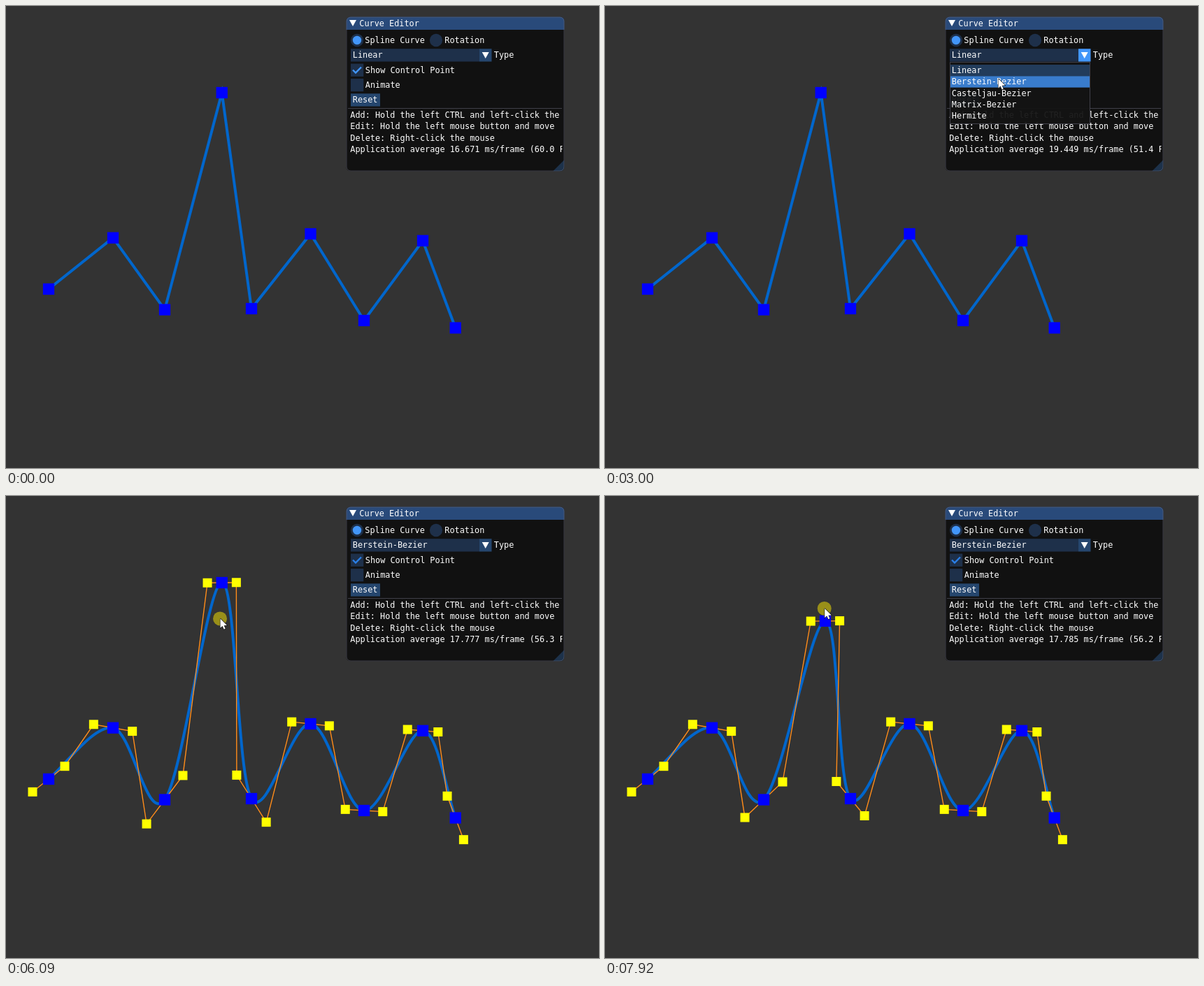
Animation of 848 by 661 pixels, one loop 7990 ms. Source, as an HTML page with a canvas:

```html
<!DOCTYPE html>
<html lang="en">
<head>
<meta charset="utf-8">
<title>Curve Editor</title>
<style>
html, body { margin: 0; width: 100%; height: 100%; overflow: hidden; background: #333; }
canvas { display: block; }
</style>
</head>
<body>
<canvas width="848" height="661"></canvas>
<script>
const ctx = document.querySelector('canvas').getContext('2d');
const LOOP = 7990, STEP = 70, LAST = 7910;
const HOVER = 1750, OPEN = 2310, SELECT = 3150, GRAB = 4830, DRAG = 6790, CLICK = 140;
const FRAME = '#1e304a', BUTTON = '#25466e', ACCENT = '#4296fa', BORDER = 'rgba(110,110,128,.5)';
const TYPES = ['Linear', 'Berstein-Bezier', 'Casteljau-Bezier', 'Matrix-Bezier', 'Hermite'];
const LEFT = 493, ROW = 21.36, FRAME_H = 18.3, LINE = 16.3;
const HOME = [[61, 405], [153, 331.7], [227, 434.5], [308.7, 124], [351, 433],
  [435.5, 326], [512, 450], [596, 335.8], [642.7, 460.5]];

// Turning points of the pointer: time, x, y
const CURSOR = [[70, 590, 635], [840, 612, 103], [1190, 566, 112], [1750, 589, 66],
  [OPEN, 589, 66], [3010, 562, 104], [SELECT, 562, 104], [3640, 200, 403],
  [4130, 303, 108], [4480, 316, 118], [5040, 310, 118], [5880, 306, 271],
  [6230, 306, 125], [6685, 318, 126], [6930, 322, 238], [7350, 322, 285], [8120, 312, 135]];
// Measured frame time: time, ms
const FRAME_MS = [[0, 16.671], [2030, 19.874], [3010, 19.449], [4480, 16.89],
  [6090, 17.777], [6930, 16.818], [7910, 17.785]];

const linear = u => u;
const swing = u => (1 - Math.cos(Math.PI * u)) / 2;

function sample(keys, t, ease) {
  const i = Math.max(1, keys.findIndex(k => k[0] > t) + keys.length) % keys.length || keys.length - 1;
  const a = keys[i - 1], b = keys[i];
  const u = ease(Math.min(1, Math.max(0, (t - a[0]) / (b[0] - a[0]))));
  return a.slice(1).map((v, n) => v + (b[n + 1] - v) * u);
}

const cursorAt = t => sample(CURSOR, Math.max(t, CURSOR[0][0]), swing);

function rect(x, y, w, h, color) {
  ctx.fillStyle = color;
  ctx.fillRect(x, y, w, h);
}

const square = ([x, y], size, color) => rect(x - size / 2, y - size / 2, size, size, color);

function disc(x, y, r, color) {
  ctx.fillStyle = color;
  ctx.beginPath();
  ctx.arc(x, y, r, 0, 7);
  ctx.fill();
}

function polygon(points, color) {
  ctx.fillStyle = color;
  ctx.beginPath();
  points.forEach(p => ctx.lineTo(...p));
  ctx.fill();
}

function polyline(points, color, width) {
  ctx.strokeStyle = color;
  ctx.lineWidth = width;
  ctx.beginPath();
  points.forEach(p => ctx.lineTo(...p));
  ctx.stroke();
}

function text(s, x, middle) {
  ctx.fillStyle = '#fff';
  ctx.fillText(s, x - .7, middle + 4);
}

const downArrow = (x, y) => polygon([[x - 5, y - 4], [x + 5, y - 4], [x, y + 5]], '#fff');

// Handles sit one sixth of the neighbour span away; a quarter of the segment at the ends.
function withHandles(points) {
  return points.map((p, i) => {
    const a = points[i - 1] || p, b = points[i + 1] || p;
    const k = a === p || b === p ? 4 : 6;
    const dx = (b[0] - a[0]) / k, dy = (b[1] - a[1]) / k;
    return [[p[0] - dx, p[1] - dy], p, [p[0] + dx, p[1] + dy]];
  });
}

function drawCurve(points, bezier) {
  if (!bezier) {
    polyline(points, '#0066cc', 4);
  } else {
    const knots = withHandles(points);
    ctx.strokeStyle = '#0066cc';
    ctx.lineWidth = 4;
    ctx.beginPath();
    ctx.moveTo(...points[0]);
    for (let i = 1; i < knots.length; i++)
      ctx.bezierCurveTo(...knots[i - 1][2], ...knots[i][0], ...points[i]);
    ctx.stroke();
    polyline(knots.flat(), '#ff8c1a', 1.4);
    knots.forEach(([a, , b]) => [a, b].forEach(h => square(h, 13, '#ff0')));
  }
  points.forEach(p => square(p, 16.3, '#00f'));
}

function drawPanel(t, bezier, open, hover) {
  const middle = row => 49 + row * ROW;
  const box = (x, row, w, color) => rect(x, middle(row) - FRAME_H / 2, w, FRAME_H, color);

  ctx.save();
  ctx.beginPath();
  ctx.roundRect(486.5, 15.5, 312, 221, 6);
  ctx.clip();
  rect(486, 15, 313, 222, '#111');
  rect(486, 15, 313, 19, '#294a7a');
  polygon([[782, 236.5], [798.5, 220], [798.5, 236.5]], '#1d324b');
  ctx.restore();
  ctx.strokeStyle = BORDER;
  ctx.lineWidth = 1;
  ctx.beginPath();
  ctx.roundRect(487, 16, 311, 220, 6);
  ctx.stroke();

  downArrow(496, 24);
  text('Curve Editor', 506, 25);
  disc(502, middle(0), FRAME_H / 2, FRAME);
  disc(502, middle(0), 6.2, ACCENT);
  text('Spline Curve', 514, middle(0));
  disc(615, middle(0), FRAME_H / 2, FRAME);
  text('Rotation', 628, middle(0));

  box(LEFT, 1, 184, hover ? BUTTON : FRAME);
  box(677, 1, 17.5, hover || open ? ACCENT : BUTTON);
  downArrow(685.7, 70);
  text(TYPES[bezier ? 1 : 0], 496.5, middle(1));
  text('Type', 698.5, middle(1));

  box(LEFT, 2, FRAME_H, FRAME);
  polyline([[496, 91.5], [500, 95.5], [508, 87.5]], bezier ? '#2a7fe6' : ACCENT, 2.4);
  text('Show Control Point', 514.5, middle(2));
  box(LEFT, 3, FRAME_H, FRAME);
  text('Animate', 514.5, middle(3));
  box(LEFT, 4, 42, BUTTON);
  text('Reset', 496.5, middle(4));
  rect(489, 146, 306, 1, '#3f3f48');

  const [ms] = sample(FRAME_MS, t, linear);
  ctx.save();
  ctx.beginPath();
  ctx.rect(487, 147, 308.5, 88);
  ctx.clip();
  ['Add: Hold the left CTRL and left-click the mouse',
   'Edit: Hold the left mouse button and move',
   'Delete: Right-click the mouse',
   `Application average ${ms.toFixed(3)} ms/frame (${(1000 / ms).toFixed(1)} FPS)`
  ].forEach((line, i) => text(line, LEFT, 156 + i * LINE));
  ctx.restore();
}

function drawPopup(y) {
  rect(LEFT, 80, 201, 89, 'rgba(20,20,20,.94)');
  ctx.strokeStyle = BORDER;
  ctx.lineWidth = 1;
  ctx.strokeRect(LEFT + .5, 80.5, 200, 88);
  const hovered = Math.floor((y - 84) / LINE);
  TYPES.forEach((name, i) => {
    const top = 84 + i * LINE;
    if (i === hovered) rect(LEFT + 1, top, 199, LINE, '#397ccc');
    else if (i === 0) rect(LEFT + 1, top, 199, LINE, '#223c5b');
    text(name, 496.5, top + LINE / 2);
  });
}

function drawCursor(x, y, pressed) {
  if (pressed) disc(x, y, 10, 'rgba(255,235,0,.5)');
  ctx.save();
  ctx.translate(x + .5, y);
  const shape = [[0, 0], [0, 13.4], [3, 10.5], [5.2, 15.4], [7.2, 14.4], [5.2, 9.8], [9.5, 9.6], [0, 0]];
  polyline(shape, '#111', 1.2);
  polygon(shape, '#fff');
  ctx.restore();
}

function draw(now) {
  const t = Math.min(LAST, Math.floor((now % LOOP + 10) / STEP) * STEP);
  const bezier = t >= SELECT, open = t >= OPEN && !bezier;
  const hover = t >= HOVER && t < OPEN;
  const pressed = t >= GRAB || [OPEN, SELECT].some(click => Math.abs(t - click) < CLICK / 2 + 1);
  const [x, y] = cursorAt(t);
  // The dragged point trails the pointer by one step.
  const points = HOME.map((p, i) => i === 3 && t >= DRAG ? cursorAt(t - STEP) : p);

  rect(0, 0, 848, 661, '#333');
  ctx.font = '11.83px "DejaVu Sans Mono", monospace';
  drawCurve(points, bezier);
  drawPanel(t, bezier, open, hover);
  if (open) drawPopup(y);
  if (t >= CURSOR[0][0]) drawCursor(x, y, pressed);
}

const start = performance.now();
function tick() {
  draw(performance.now() - start);
  requestAnimationFrame(tick);
}
tick();
</script>
</body>
</html>
```
